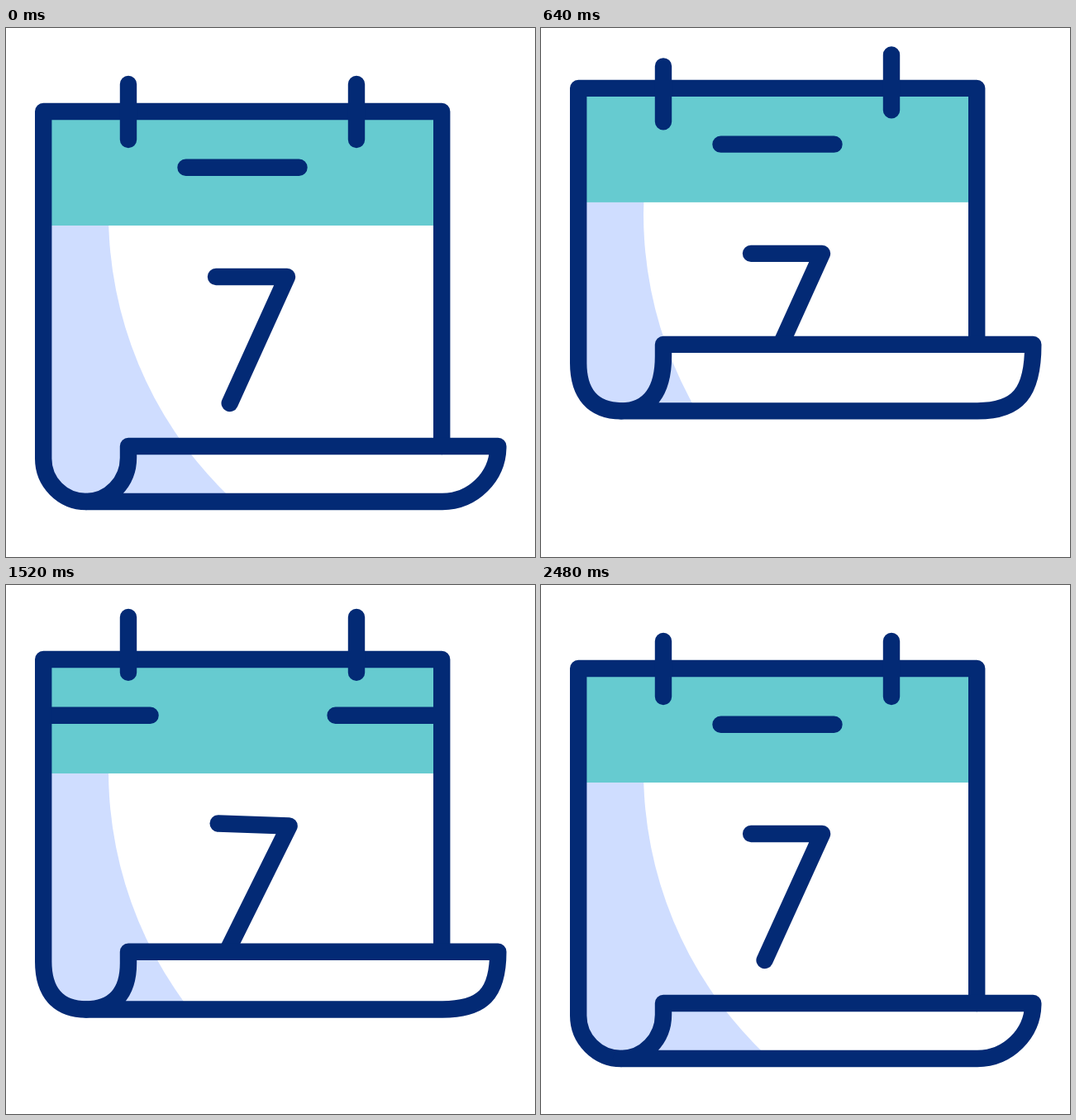
Animation, 640 px wide and 640 px high, one loop 2.88 s. Source, as an HTML page:

```html
<!DOCTYPE html>
<html lang="en">
<head>
<meta charset="utf-8">
<title>Calendar</title>
<style>
  html, body { margin: 0; width: 100%; height: 100%; overflow: hidden; background: #fff; }
  svg { display: block; width: 100vw; height: 100vh; }
  .line { fill: none; stroke: #032a75; stroke-width: 20.4; stroke-linecap: round; stroke-linejoin: round; }
</style>
</head>
<body>
<svg viewBox="0 0 640 640">
  <defs>
    <clipPath id="bodyClip"><path id="bodyArea"/></clipPath>
    <clipPath id="flapClip"><path id="flapArea"/></clipPath>
    <clipPath id="barClip"><rect x="45" y="0" width="482" height="640"/></clipPath>
    <g id="paper">
      <rect width="640" height="640" fill="#cfddff"/>
      <circle cx="597" cy="225" r="473" fill="#fff"/>
    </g>
  </defs>
  <g clip-path="url(#bodyClip)">
    <use href="#paper"/>
    <rect id="head" x="45" width="482" height="138" fill="#66cbd0"/>
    <path id="digit" class="line" d="M254 200H340L270.7 353"/>
  </g>
  <g clip-path="url(#barClip)"><path id="bar" class="line"/></g>
  <g clip-path="url(#flapClip)"><use href="#paper"/></g>
  <path id="frame" class="line"/>
  <path id="flap" class="line"/>
  <path id="rings" class="line"/>
</svg>
<script>
const LOOP = 2880, STEP = 40, END = 2480;
const $ = id => document.getElementById(id);
const set = (id, name, value) => $(id).setAttribute(name, value);
const clamp = x => Math.max(0, Math.min(1, x));
const ease = u => (1 - Math.cos(Math.PI * clamp(u))) / 2;

// Sine-eased moves from one pose to the next, added up.
const moves = (times, poses) => t => poses.slice(1).reduce((v, p, i) =>
  v + (p - poses[i]) * ease((t - times[i]) / (times[i + 1] - times[i])), poses[0]);

// Poses: rest, dip, lift, drop or hold, rebound, rest.
const beat = [0, 395, 715, 1050, 1385, 1990];
const headTop = moves(beat, [101, 119, 66, 120, 88.5, 101]);
const ringRight = moves(beat, [68, 109, 21, 91, 35, 68]);
const ringLeft = moves(beat, [68, 109, 37, 79, 35, 68]);
const bottom = moves([0, 380, 790, 1310, 1712, 2043], [573, 624, 396, 415, 599, 573]);
const flapTop = moves([0, 389, 800, 1304, 1706, 2043], [506, 580, 286, 288, 567, 506]);
const slide = moves([1038, 2000], [0, 361]);
const tilt = t => t < 1000 ? 0 : 2 * Math.exp((1520 - t) / 300);

function draw(t) {
  const T = headTop(t), B = bottom(t), R = flapTop(t), h = B - R;

  // Speed and stretch make the rolled corners squarer.
  const fast = clamp(Math.abs(B - bottom(t - 10)) / 5);
  const tall = clamp((h - 67) / 48);
  const ql = 0.55 + 0.1 * fast;
  const qc = 0.55 + Math.max(0.1 * fast, 0.2 * tall);
  const qr = 0.55 + Math.max(0.18 * fast, 0.3 * tall);
  const e = 52 + 6 * fast, c = h - 14;

  const left = `V${B - e}C45.2 ${B - e + e * ql} ${97 - 52 * ql} ${B} 97 ${B}`;
  const curl = `C${97 + 51 * qc} ${B} 148 ${B - c + c * qc} 148 ${B - c}V${R}`;
  const edge = `M148 ${R}H595.3C595.3 ${R + h * qr} ${528 + 67 * qr} ${B} 528 ${B}H97`;
  const flap = edge + curl + 'Z';
  const frame = `M527.2 ${R}V${T}H45.2${left}`;

  set('bodyArea', 'd', `${frame}${curl}Z`);
  set('flapArea', 'd', flap);
  set('flap', 'd', flap);
  set('frame', 'd', frame);
  set('head', 'y', T);
  set('digit', 'transform', `translate(0 ${T}) rotate(${tilt(t)} 297 276)`);

  const s = slide(t);
  set('bar', 'd', [s, s - 361].map(x => `M${217.5 + x} ${T + 67.8}h137`).join(''));
  set('rings', 'd', `M148 ${ringLeft(t)}v67M424 ${ringRight(t)}v67`);
}

const start = performance.now();
function tick() {
  const t = (performance.now() - start) % LOOP;
  draw(Math.min(END, Math.floor(t / STEP) * STEP));
  requestAnimationFrame(tick);
}
draw(0);
requestAnimationFrame(tick);
</script>
</body>
</html>
```
